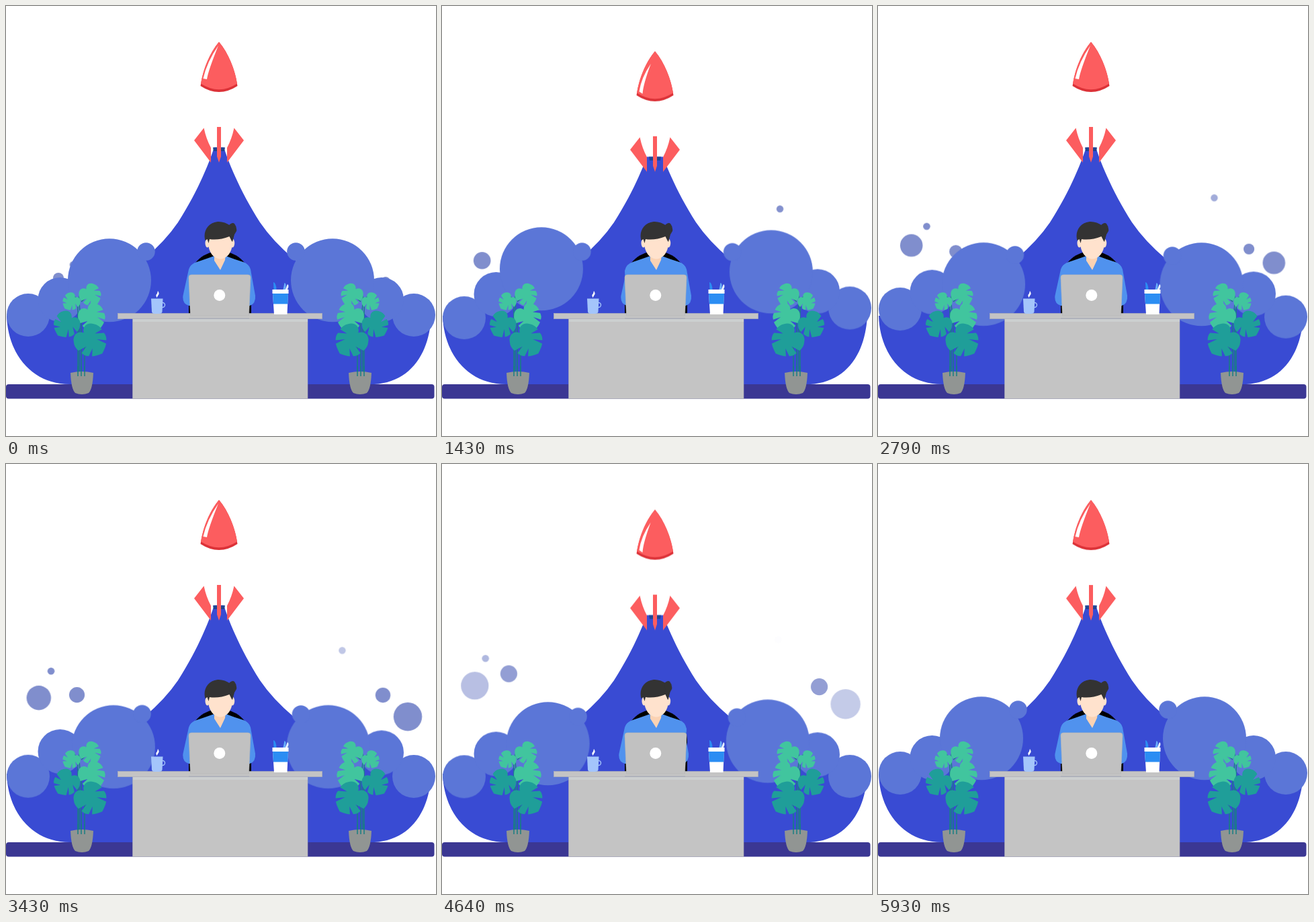
An HTML page without scripts that plays this animation: 640 px wide and 640 px high, repeating every 6000 ms.

```html
<!DOCTYPE html>
<html lang="en">
<head>
<meta charset="utf-8">
<title>Desk launch</title>
<style>
html, body { margin: 0; width: 100%; height: 100%; overflow: hidden; background: #fff; }
svg { display: block; width: 100vw; height: 100vh; }
.m { animation: 6s ease-in-out infinite; }
.puffs { fill: #5b76d7; }
.bubbles { fill: #808ecd; }
.bubbles .m { animation-timing-function: linear; }

.rocket { animation-name: bob; }
@keyframes bob {
  0%, 40%, 60%, 100% { transform: none; }
  20%, 80% { transform: translateY(15px); }
}
.shine { animation-name: shine; }
@keyframes shine {
  0%, 40%, 60%, 100% { d: path("M316 59Q299 83 293.5 108L299 109Q301 96 316 59Z"); }
  20%, 80% { d: path("M310.5 73Q296 94 293.5 114L298.500 117.500Q299 104 310.500 73Z"); }
}

/* smoke puffs */
.big-l { animation-name: big-l; }
@keyframes big-l {
  20% { transform: translate(-6.300px, -17.500px); }
  60% { transform: translate(6px, 13px); }
}
.big-r { animation-name: big-r; }
@keyframes big-r {
  20% { transform: translate(4.500px, -14px); }
  40% { transform: translate(-4px, 4px); }
  60% { transform: translate(-6.500px, 13px); }
  80% { transform: translate(-1px, 4px); }
}
.mid-l { animation-name: mid-l; }
@keyframes mid-l {
  40% { transform: translateY(-12px); }
  60% { transform: translateY(-9px); }
}
.mid-r { animation-name: mid-r; }
@keyframes mid-r {
  20% { transform: translateY(-12.500px); }
  60% { transform: translateY(-7.500px); }
}
.low-l { animation-name: low-l; }
@keyframes low-l {
  20%, 60%, 75% { transform: translateY(5.500px); }
  40% { transform: translateY(-13px); }
}
.low-r { animation-name: low-r; }
@keyframes low-r {
  23% { transform: translateY(-10.500px); }
  55%, 75% { transform: translateY(5px); }
}
.tip-l { animation-name: tip-l; }
@keyframes tip-l {
  0%, 20%, 100% { transform: none; }
  60% { transform: translate(-6px, 6.500px); }
  78% { transform: translate(-6px, 10.500px); }
}
.tip-r { animation-name: tip-r; }
@keyframes tip-r {
  0%, 15%, 100% { transform: none; }
  57% { transform: translate(7.500px, 7px); }
  76% { transform: translate(7.500px, 11.500px); }
}

/* rising bubbles */
.b1 { animation-name: b1; }
@keyframes b1 {
  0%, 10% { transform: translate(78px, 405px) scale(8); opacity: 1; }
  23.8% { transform: translate(59.700px, 379px) scale(12.800); }
  36.8% { transform: translate(50.500px, 364px) scale(15.500); }
  57.2% { transform: translate(48.800px, 348px) scale(18.200); opacity: 1; }
  70.2% { transform: translate(48.800px, 337.500px) scale(20); opacity: .75; }
  85.7% { transform: translate(48.800px, 321px) scale(21.300); opacity: .34; }
  97%, 100% { transform: translate(48.800px, 309px) scale(21.300); opacity: 0; }
}
.b2 { animation-name: b2; }
@keyframes b2 {
  0%, 22% { transform: translate(100px, 385px) scale(5.300); opacity: 1; }
  36.8% { transform: translate(77.400px, 346px) scale(5.300); }
  57.2% { transform: translate(67px, 308.300px) scale(5.300); }
  70.2% { transform: translate(64.600px, 295px) scale(5.300); opacity: 1; }
  85.7% { transform: translate(64.800px, 283px) scale(5.300); opacity: .2; }
  90%, 100% { transform: translate(64.800px, 280px) scale(5.300); opacity: 0; }
}
.b3 { animation-name: b3; }
@keyframes b3 {
  0%, 37% { transform: translate(125px, 385px) scale(8); opacity: 1; }
  57.2% { transform: translate(105.500px, 343.600px) scale(11.600); }
  70.2% { transform: translate(97.500px, 321.500px) scale(12.600); opacity: 1; }
  85.7% { transform: translate(101.600px, 301.300px) scale(12.600); opacity: .68; }
  97%, 100% { transform: translate(101.600px, 286px) scale(12.600); opacity: 0; }
}
.b4 { animation-name: b4; }
@keyframes b4 {
  0%, 8% { transform: translate(490px, 352px) scale(5); opacity: 1; }
  23.8% { transform: translate(503px, 302px) scale(5.200); }
  36.8% { transform: translate(500.500px, 292.800px) scale(5.200); opacity: .95; }
  57.2% { transform: translate(500.400px, 277.500px) scale(5.200); opacity: .5; }
  70.2% { transform: translate(500.400px, 267px) scale(5.200); opacity: .2; }
  78%, 100% { transform: translate(500.400px, 261px) scale(5.200); opacity: 0; }
}
.b5 { animation-name: b5; }
@keyframes b5 {
  0%, 25% { transform: translate(525px, 405px) scale(3); opacity: 1; }
  36.8% { transform: translate(544px, 378px) scale(5.200); }
  57.2% { transform: translate(561px, 344px) scale(11.200); }
  70.2% { transform: translate(561.500px, 335.500px) scale(12.600); opacity: 1; }
  85.7% { transform: translate(561.500px, 327px) scale(12.600); opacity: .68; }
  97%, 100% { transform: translate(561.500px, 320px) scale(12.600); opacity: 0; }
}
.b6 { animation-name: b6; }
@keyframes b6 {
  0%, 24% { transform: translate(565px, 410px) scale(7); opacity: 1; }
  36.8% { transform: translate(581.500px, 388px) scale(12.800); }
  57.2% { transform: translate(598px, 376px) scale(21.200); opacity: 1; }
  70.2% { transform: translate(601px, 364px) scale(22.200); opacity: .66; }
  85.7% { transform: translate(600.200px, 349.500px) scale(22.200); opacity: .24; }
  95%, 100% { transform: translate(600.200px, 341px) scale(22.200); opacity: 0; }
}

/* typing and head turn */
.arm-l { animation-name: arm-l; }
@keyframes arm-l {
  0%, 15%, 34%, 78%, 94%, 100% { transform: none; }
  24% { transform: translateX(3px); }
  86% { transform: translateX(1px); }
}
.arm-r { animation-name: arm-r; }
@keyframes arm-r {
  0%, 61%, 95%, 100% { transform: none; }
  70%, 86% { transform: translateX(-4px); }
}
.ear-l { animation-name: ear-l; }
@keyframes ear-l {
  0%, 60%, 82%, 100% { transform: none; }
  70% { transform: translateX(3px); }
}
.ear-r { animation-name: ear-r; }
@keyframes ear-r {
  0%, 75%, 97%, 100% { transform: none; }
  86% { transform: translateX(-2px); }
}
.bun { animation-name: bun; }
@keyframes bun {
  0%, 60%, 82%, 100% { transform: none; }
  70% { transform: translateX(-3px); }
}
</style>
</head>
<body>
<svg viewBox="0 0 640 640">
  <defs>
    <path id="leaf" d="M0-13C4-21 13-20 17-13Q21-8 20-1L10-3L19 4Q19 9 15 13L7 4L12 16Q8 19 0 22Q-8 19-12 16L-5 9L-15 13Q-19 9-19 4L-9 2L-20-1Q-21-8-17-13C-13-20-4-21 0-13Z"/>
    <g id="plant">
      <path d="M107 550V455Q107 436 101 431M112 550V470Q108 440 109 431M109 550V480M117 550V500M112 440L122 432M112 470L120 462" fill="none" stroke="#187f83" stroke-width="1.500"/>
      <g fill="#41c59e">
        <use href="#leaf" transform="translate(125.500 430) rotate(-35) scale(.8)"/>
        <use href="#leaf" transform="translate(97 440) rotate(42) scale(.64)"/>
        <use href="#leaf" transform="translate(128 463) rotate(-30) scale(.98)"/>
      </g>
      <g fill="#1f9e99">
        <use href="#leaf" transform="translate(90 474) rotate(38) scale(.95)"/>
        <use href="#leaf" transform="translate(126 498) rotate(-42) scale(1.180)"/>
      </g>
      <path d="M96 546Q113 542 130 546Q129 570 123 576Q113 580 103 576Q97 570 96 546Z" fill="#919593"/>
      <path d="M107 551V536M112 551V536M117 551V536" stroke="#187f83" stroke-width="1.500"/>
    </g>
  </defs>

  <path d="M313 200C306 225 288 272 256 322Q237 350 205 377L150 410L80 440L33 461H1C3 520 40 563 95 563H548C600 560 630 520 633 461H600L559 440L484 410L429 377Q397 350 378 322C346 272 328 225 321 200Z" fill="#394bd3"/>
  <rect y="563" width="637.500" height="21.500" rx="4" fill="#3b3793"/>

  <g class="bubbles">
    <circle class="m b1" r="1"/><circle class="m b2" r="1"/><circle class="m b3" r="1"/>
    <circle class="m b4" r="1"/><circle class="m b5" r="1"/><circle class="m b6" r="1"/>
  </g>
  <g class="puffs">
    <circle class="m low-l" cx="33" cy="460" r="32"/>
    <circle class="m mid-l" cx="80.500" cy="437" r="33"/>
    <circle class="m big-l" cx="154" cy="408.300" r="62"/>
    <circle class="m tip-l" cx="208.500" cy="365.500" r="13.300"/>
    <circle class="m low-r" cx="607" cy="460" r="32"/>
    <circle class="m mid-r" cx="559" cy="437" r="33"/>
    <circle class="m big-r" cx="486" cy="408.300" r="62"/>
    <circle class="m tip-r" cx="431.500" cy="365.500" r="13.300"/>
  </g>

  <g class="m rocket">
    <path d="M290 119H344.500L330 210.500H304Z" fill="#fff"/>
    <path d="M308 210.500H326L325 216H309Z" fill="#1d4591"/>
    <path d="M294.500 181.500L280 200L305 233V211Q298 198 294.500 181.500ZM339.500 181.500L354 200L329 233V211Q336 198 339.500 181.500ZM314 180H320V224L317 233L314 224Z" fill="#fc5d5f"/>
    <path d="M317 53.500C303 70 293 95 289.500 119Q317 137 344.500 119C341 95 331 70 317 53.500Z" fill="#dc3238"/>
    <path d="M317 53.500C303 70 293 95 290 115.500Q317 133 344 115.500C341 95 331 70 317 53.500Z" fill="#fc5d5f"/>
    <path class="m shine" d="M316 59Q299 83 293.500 108L299 109Q301 96 316 59Z" fill="#fff"/>
  </g>

  <use href="#plant"/>
  <use href="#plant" transform="translate(640) scale(-1 1)"/>

  <path d="M272 458V410C276 350 361 350 365 410V458Z"/>
  <g fill="#5092ee">
    <path class="m arm-l" d="M285 381Q274 384 272 392L263.500 431Q262 443 272 446H300V385Z"/>
    <path class="m arm-r" d="M352 381Q362 384 364 392L371 431Q372 443 363 446H335V385Z"/>
    <path d="M310 372Q296 377 284 381Q274 384 272 394L274 446H362L364 394Q362 384 353 381Q340 377 327 372Z"/>
  </g>
  <path d="M310 370H327L326 378L319 393L310 379Z" fill="#fbd2b3"/>
  <g fill="#ffe2cd">
    <ellipse class="m ear-l" cx="299.800" cy="353" rx="3.300" ry="6.500"/>
    <ellipse class="m ear-r" cx="337" cy="353" rx="3.200" ry="6.500"/>
    <path d="M301 338H337V352C337 367 328 376.500 319 376.500S301 367 301 352Z"/>
  </g>
  <g fill="#333">
    <path d="M296.500 349C293 337 299 323 315 321Q325 320.500 334 327L340 337L336.500 351L332.500 343Q317 349 303 347L301.500 353L299.500 347Z"/>
    <path class="m bun" d="M331 327Q337 321 340 324Q344 329 343 335L340 340L337 351L333 341Z"/>
  </g>

  <rect x="188.500" y="465" width="260.500" height="119.500" fill="#c4c4c4" stroke="#aaaab8" stroke-width=".6"/>
  <rect x="189" y="466" width="260" height="4" fill="#cccfd0"/>
  <rect x="166.500" y="457.500" width="304" height="8" fill="#c4c4c4" stroke="#b0b0b8" stroke-width=".7"/>
  <path d="M272 404Q272 400 276 400H360Q364 400 364 404L361.500 461H274.500Z" fill="#c1c1c1" stroke="#b6b6b6" stroke-width=".6"/>
  <path d="M272 465H362" stroke="#9da3b4" stroke-width=".8"/>
  <circle cx="317.800" cy="430.500" r="8.500" fill="#fff"/>

  <circle cx="233" cy="445" r="3.500" fill="none" stroke="#a4c5fb" stroke-width="1.400"/>
  <path d="M216 435.500H233.500L232.500 455Q232 458 228 458H221Q217.500 458 217 455Z" fill="#a4c5fb"/>
  <path d="M226 424Q229 428 226.500 430.500L224.500 434Q222 430 225 428Z" fill="#fff"/>

  <path d="M398 411Q402 412 402.500 422H398.500Z" fill="#2b8df3"/>
  <path d="M414.500 412Q418 413 415.500 422H412.500Z" fill="#69b0fa"/>
  <path d="M419 414Q422 416 419 422H415.500Z" fill="#e4f1ff"/>
  <path d="M396.500 422H420.500V428H419.800L418.500 459H399L397 428H396.500Z" fill="#fff"/>
  <path d="M397 428H420L419.300 443.500H398Z" fill="#2b8df3"/>
</svg>
</body>
</html>
```
